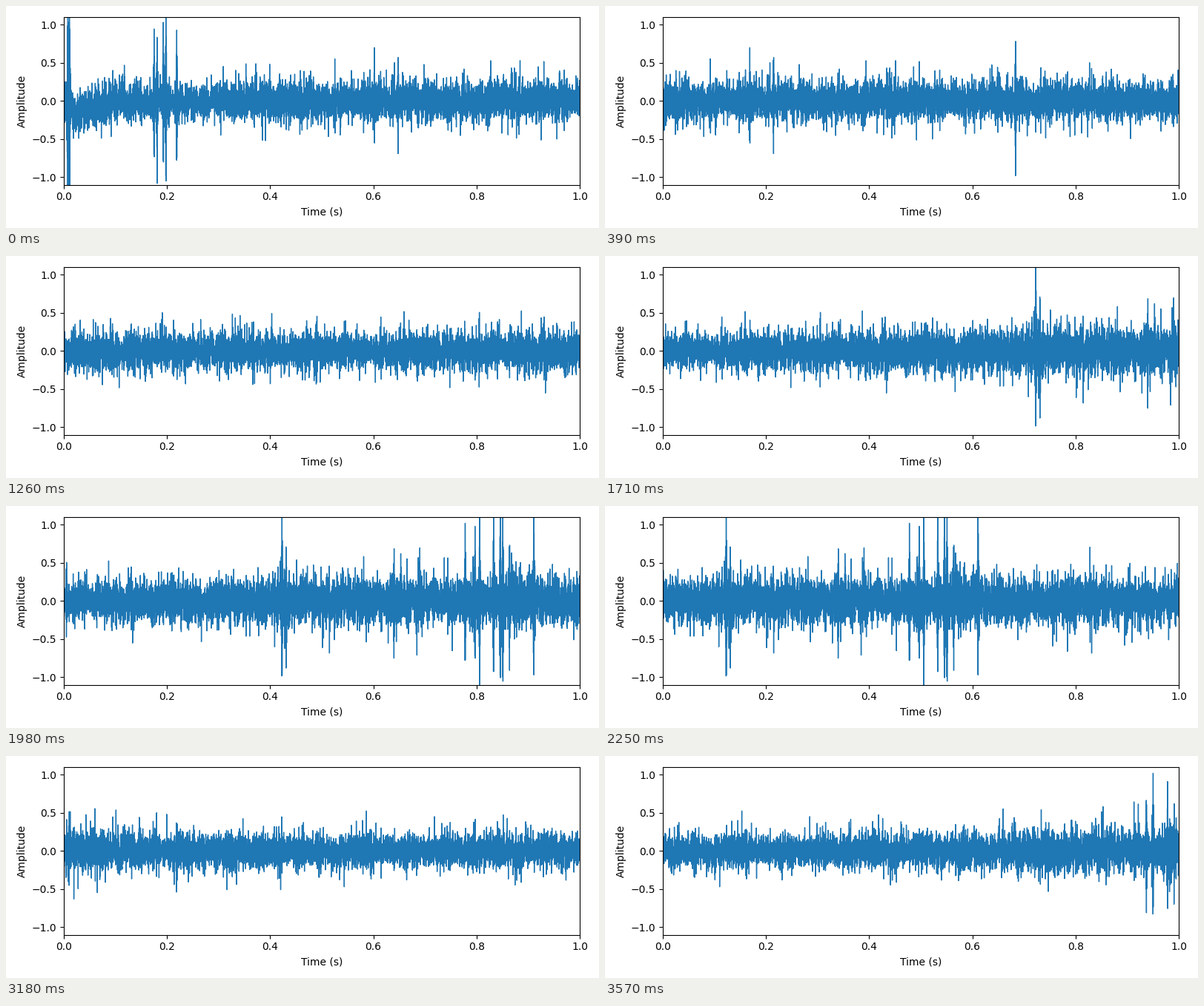
These frames come from a looping animation (800x300 px, 3.6 s). A matplotlib script:

```python
import numpy as np
import matplotlib.pyplot as plt
from matplotlib.animation import FuncAnimation

RATE = 8000      # samples per second
LENGTH = 5       # seconds of signal
STEPS = 30       # window moves per second of signal
FRAMES = 120

# Background loudness: time, level
LEVELS = [(0, 0.125), (0.9, 0.125), (1.5, 0.115), (2.3, 0.125), (2.7, 0.15),
          (3.3, 0.15), (3.6, 0.13), (4.2, 0.108), (4.6, 0.12), (5, 0.15)]

# Clicks: time, height
CLICKS = [(0.008, 1.6), (0.011, 1.6), (0.175, 0.95), (0.181, -1.08),
          (0.193, 1.03), (0.198, 1.3), (0.219, 0.93), (0.602, 0.7),
          (0.648, -0.69), (1.117, -0.98), (2.623, 1.3), (2.631, -0.88),
          (2.84, -0.75), (2.978, 1.02), (2.997, 0.98), (3.006, 1.3),
          (3.033, 1.2), (3.046, 1.3), (3.051, 1.3), (3.064, -0.91),
          (3.111, 1.3), (4.904, -0.81), (4.917, 1.02), (4.945, 0.91)]


def background(t, rng):
    """Noise with slow and fast changes of loudness and a few far outliers."""
    knots = np.arange(0, LENGTH, 0.008)
    flutter = 1 + 0.1 * np.interp(t, knots, rng.normal(size=knots.size))
    noise = np.clip(0.9 * rng.standard_t(10, size=t.size), -4.2, 4.2)
    return np.interp(t, *zip(*LEVELS)) * flutter * noise


def add_click(signal, t, when, height, decay=0.001, pitch=2000):
    """Replace the noise around a moment with a short ringing pulse."""
    dt = t - round(when * RATE) / RATE
    fade = np.exp(-np.abs(dt) / decay)
    return signal * (1 - fade) + height * fade * np.cos(2 * np.pi * pitch * dt)


def make_signal():
    t = np.arange(RATE * LENGTH) / RATE
    signal = background(t, np.random.default_rng(7))
    # the baseline sags after the opening click
    signal -= 0.15 * np.exp(-((t - 0.03) / 0.04) ** 2) * (t > 0.017)
    for when, height in CLICKS:
        signal = add_click(signal, t, when, height)
    return signal


signal = make_signal()
x = np.arange(RATE) / RATE

fig, ax = plt.subplots(figsize=(8, 3), dpi=100, layout="tight")
line, = ax.plot(x, signal[:RATE], lw=1)
ax.set(xlim=(0, 1), ylim=(-1.1, 1.1), xlabel="Time (s)", ylabel="Amplitude")


def update(n):
    start = n * RATE // STEPS
    line.set_ydata(signal[start:start + RATE])
    return line,


anim = FuncAnimation(fig, update, frames=FRAMES, interval=30,
                     repeat=True, repeat_delay=0)
plt.show()
```
